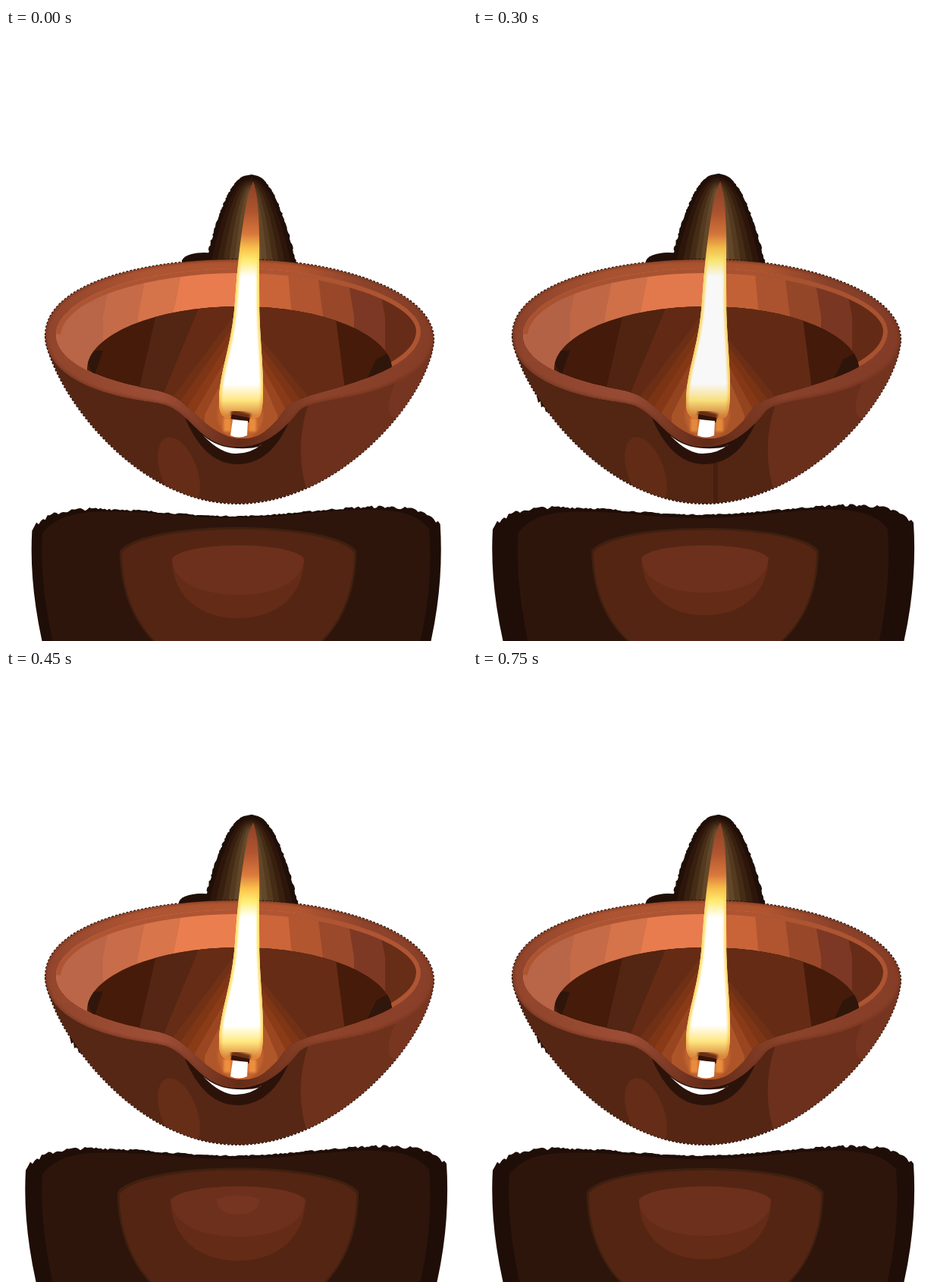
Write an HTML page that moves like this. It is 608 by 808 pixels and loops after 900 ms.

```html
<!DOCTYPE html>
<html lang="en">
<head>
<meta charset="utf-8">
<title>Clay lamp</title>
<style>
  html, body { margin: 0; width: 100%; height: 100%; overflow: hidden; background: #fff; }
  svg { display: block; width: 100vw; height: 100vh; }
</style>
</head>
<body>
<svg viewBox="0 0 608 808">
  <defs>
    <path id="bodyShape" d="M52 407C58 470 165 627 305 627S562 480 564 410L308 360z"/>
    <path id="rimShape" d="M52 405C52 340 170 305 308 305S564 350 564 410C562 455 500 478 440 488S390 503 375 518 340 552 305 552 255 530 235 512 205 495 180 491 52 470 52 405z"/>
    <path id="openingShape" d="M66 403C72 350 190 317 308 317S547 355 547 400C546 440 480 463 420 479S372 502 355 519 330 541 310 541 270 528 250 509 222 482 190 476 66 450 66 403z"/>
    <path id="flameShape" d="M326 202C336 230 334 290 334 340 333 400 340 440 339 485Q338 515 330 514H290Q280 510 281 490C282 450 298 420 302 360 306 300 314 230 326 202z"/>

    <clipPath id="body"><use href="#bodyShape"/></clipPath>
    <clipPath id="rim"><use href="#rimShape"/></clipPath>
    <clipPath id="opening"><use href="#openingShape"/></clipPath>
    <clipPath id="oil"><ellipse cx="308" cy="450" rx="201" ry="83"/><path d="M107 450h402v110H107z"/></clipPath>
    <clipPath id="flame"><use href="#flameShape"/></clipPath>

    <linearGradient id="backRim">
      <stop offset="0" stop-color="#8f442c"/><stop offset=".25" stop-color="#ad5432"/>
      <stop offset=".65" stop-color="#b0552f"/><stop offset=".82" stop-color="#8c432b"/>
      <stop offset="1" stop-color="#863d27"/>
    </linearGradient>
    <linearGradient id="frontRim">
      <stop offset="0" stop-color="#8f442c"/><stop offset=".3" stop-color="#9c4d35"/>
      <stop offset=".5" stop-color="#632b18"/><stop offset=".7" stop-color="#8c432b"/>
      <stop offset="1" stop-color="#863d27"/>
    </linearGradient>
    <linearGradient id="fire" gradientUnits="userSpaceOnUse" x1="0" y1="202" x2="0" y2="516">
      <stop offset="0" stop-color="#8a3f26"/><stop offset=".13" stop-color="#b0552f"/>
      <stop offset=".22" stop-color="#d8773c"/><stop offset=".28" stop-color="#f8c04c"/>
      <stop offset=".33" stop-color="#ffea70"/><stop offset=".4" stop-color="#fff"/>
      <stop offset=".85" stop-color="#fff"/><stop offset=".92" stop-color="#ffe680"/>
      <stop offset="1" stop-color="#d0702e"/>
    </linearGradient>
    <linearGradient id="flameEdge" gradientUnits="userSpaceOnUse" x1="0" y1="280" x2="0" y2="516">
      <stop offset="0" stop-color="#f6b645" stop-opacity="0"/><stop offset=".2" stop-color="#ffdf60"/>
      <stop offset=".85" stop-color="#ffd660"/><stop offset="1" stop-color="#d87a34"/>
    </linearGradient>
    <filter id="soft" x="-30%" y="-10%" width="160%" height="120%"><feGaussianBlur stdDeviation="1.5"/></filter>
  </defs>

  <g id="halo"></g>
  <g id="floor"></g>
  <g id="floorMid"></g>
  <g id="floorGlow"></g>
  <path id="chip" fill="#1f0e07" d="M84 484l2 10 3-2 1 8 4-2 2 8 6-1-10-15z"/>

  <g id="lamp">
    <g fill="none" stroke="#2b130a" stroke-width="2" stroke-dasharray="3 2">
      <use href="#bodyShape"/><use href="#rimShape"/>
    </g>
    <g clip-path="url(#body)">
      <use href="#bodyShape" fill="#552614"/>
      <ellipse cx="228" cy="585" rx="24" ry="48" fill="#652c17" transform="rotate(-20 228 585)"/>
      <path fill="#6c301c" d="M405 480Q375 550 400 620L580 500V400z"/>
      <ellipse cx="535" cy="470" rx="20" ry="50" fill="#763520" transform="rotate(30 535 470)"/>
      <path id="streak" stroke="#48200f" stroke-width="6" d="M320 572v55"/>
      <path fill="#2b130a" d="M236 514Q262 575 305 575T372 522z"/>
    </g>

    <g clip-path="url(#rim)">
      <use href="#rimShape" fill="url(#backRim)"/>
      <path fill="url(#frontRim)" d="M52 440h512v120H52z"/>
      <use href="#rimShape" fill="none" stroke="#70331f" stroke-width="4" opacity=".6" filter="url(#soft)"/>
    </g>

    <g clip-path="url(#opening)">
      <g id="wall"></g>
      <use href="#openingShape" fill="none" stroke="#ad5432" stroke-width="12" stroke-dasharray="600 2000"/>
      <g clip-path="url(#oil)">
        <path fill="#461b0a" d="M100 360h420v200H100z"/>
        <path fill="#532513" d="M202 360L170 500H450L432 360z"/>
        <path fill="#652b15" d="M258 360L200 500H450L432 360z"/>
        <path fill="#2f160b" d="M100 425h28l-12 35zM510 425l-22 12-14 30h45z"/>
        <g id="rays"></g>
        <ellipse cx="309" cy="510" rx="30" ry="32" fill="#c0622e" filter="url(#soft)"/>
      </g>
    </g>

    <use href="#flameShape" fill="url(#fire)"/>
    <g clip-path="url(#flame)">
      <use href="#flameShape" fill="none" stroke="url(#flameEdge)" stroke-width="6" filter="url(#soft)"/>
    </g>
    <path stroke="#e98d3d" stroke-width="10" d="M292 514v18M325 514v18" filter="url(#soft)"/>
    <path stroke="#6b2e12" stroke-width="9" d="M297 506L322 513" filter="url(#soft)"/>
    <path stroke="#351307" stroke-width="6" d="M297 512L321 517"/>
  </g>

  <g fill="#fff">
    <path d="M299 516L319 518 318 537Q307 542 296 537z"/>
    <path d="M260 537Q278 553 305 554T337 549Q323 561 303 561T260 537z"/>
  </g>
</svg>

<script>
const $ = id => document.getElementById(id);
const shape = (color, d) => `<path fill="${color}" d="${d}"/>`;
const scaleAbout = (x, y, sx, sy = sx) =>
  `translate(${x} ${y}) scale(${sx} ${sy}) translate(${-x} ${-y})`;

let seed = 7;
const random = () => (seed = seed * 16807 % 2147483647) / 2147483647;

// Bell-shaped glow behind the flame.
function bell(halfWidth, top, rough) {
  const left = [], right = [];
  for (let y = top; y <= 318; y += 2) {
    const w = halfWidth * Math.min(1, (y - top) / 116) ** .47;
    left.unshift([323 - w - rough * random(), y]);
    right.push([323 + w + rough * random(), y]);
  }
  return `M${left.concat(right).join(' ')}z`;
}

// Ground under the lamp: a wavy top edge with rounded shoulders.
function ground(halfWidth, drop, rough) {
  const edge = [];
  for (let x = -halfWidth; x <= halfWidth; x += 3) {
    const u = Math.abs(x) / halfWidth;
    const y = 642 - 10 * Math.sin(Math.PI * u / 1.4) ** 2 + 24 * u ** 12 - x / 140;
    edge.push([304 + x, y + drop - rough * random() * (.3 + u * u)]);
  }
  const [l, r] = [304 - halfWidth, 304 + halfWidth];
  return `M${edge.join(' ')}Q${r + 4} 730 ${r - 14} 810H${l + 14}Q${l - 4} 730 ${edge[0]}z`;
}

// Cup-shaped pool of light.
function cup(halfWidth, top, bottom) {
  const c = 306, l = c - halfWidth, r = c + halfWidth, inset = halfWidth * .2;
  const side = top + inset, high = top - inset / 3, low = side + .6 * (bottom - side);
  return `M${l} ${side}C${l + inset} ${high} ${r - inset} ${high} ${r} ${side}
    C${r} ${low} ${c + 3 * inset} ${bottom} ${c} ${bottom}S${l} ${low} ${l} ${side}z`;
}

const haloColors = ['#2d150c', '#38200f', '#452c17', '#543b20', '#634729', '#745433'];
$('halo').innerHTML =
  '<ellipse cx="258" cy="308" rx="30" ry="12" fill="#1f0f07"/>' +
  shape('#1f0f07', bell(61, 192, 2)) +
  haloColors.map((color, i) => shape(color, bell(56 - 8 * i, 197 + 3 * i, 0))).join('');

$('floor').innerHTML = shape('#1f0e07', ground(278, 0, 5));
$('floorMid').innerHTML = shape('#2e150c', ground(256, 4, 0));
$('floorGlow').innerHTML =
  shape('#40200f', cup(156, 658, 852)) +
  shape('#542513', cup(153, 661, 850)) +
  shape('#642b17', cup(87, 682, 778)) +
  shape('#6d301c', cup(87, 682, 747)) +
  `<g id="floorSpot">${shape('#763521', cup(28, 694, 718))}</g>`;

const wallLeft = ['#d5734a', '#c66b48', '#b86548'];
const wallRight = ['#c96438', '#b0552f', '#984829', '#7c3824', '#662c17'];
$('wall').innerHTML =
  shape('#e87c4e', 'M50 300h520v260H50z') +
  wallLeft.map((color, i) => shape(color, `M50 300H${236 - 46 * i}l-16 80V560H50z`)).join('') +
  wallRight.map((color, i) => shape(color, `M570 300H${332 + 38 * i}l${4 + 3 * i} 80V560H570z`)).join('');

const rayColors = ['#6f3016', '#7d3515', '#8a3a17', '#984520', '#ad5529'];
$('rays').innerHTML = rayColors.map((color, i) => {
  const spread = 108 - 15 * i;
  return shape(color, `M${306 + 2 * i} ${372 + 9 * i}L${310 - spread} 510V560H${310 + spread}V510z`);
}).join('');

const STEP = 150;
const glowLevels = [1, 1.04, .96, 1.02, .98, 1];

function draw() {
  const step = Math.floor(performance.now() / STEP) % glowLevels.length;
  const glow = glowLevels[step];
  const small = step === 0;
  const dim = glow < 1;

  $('lamp').style.filter = `brightness(${1 + (glow - 1) * .7})`;
  $('halo').setAttribute('transform', scaleAbout(323, 306, small ? .96 : 1, small ? .99 : 1));
  $('floor').setAttribute('transform', scaleAbout(304, 808, small ? .97 : 1, small ? .988 : 1));
  $('floorMid').setAttribute('transform', scaleAbout(304, 700, dim ? .955 : 1, 1));
  $('floorGlow').setAttribute('transform', scaleAbout(306, 680, glow));
  $('floorSpot').style.display = step === 3 ? '' : 'none';
  $('streak').style.display = dim ? '' : 'none';
  $('chip').style.display = small ? 'none' : '';
  requestAnimationFrame(draw);
}
draw();
</script>
</body>
</html>
```
